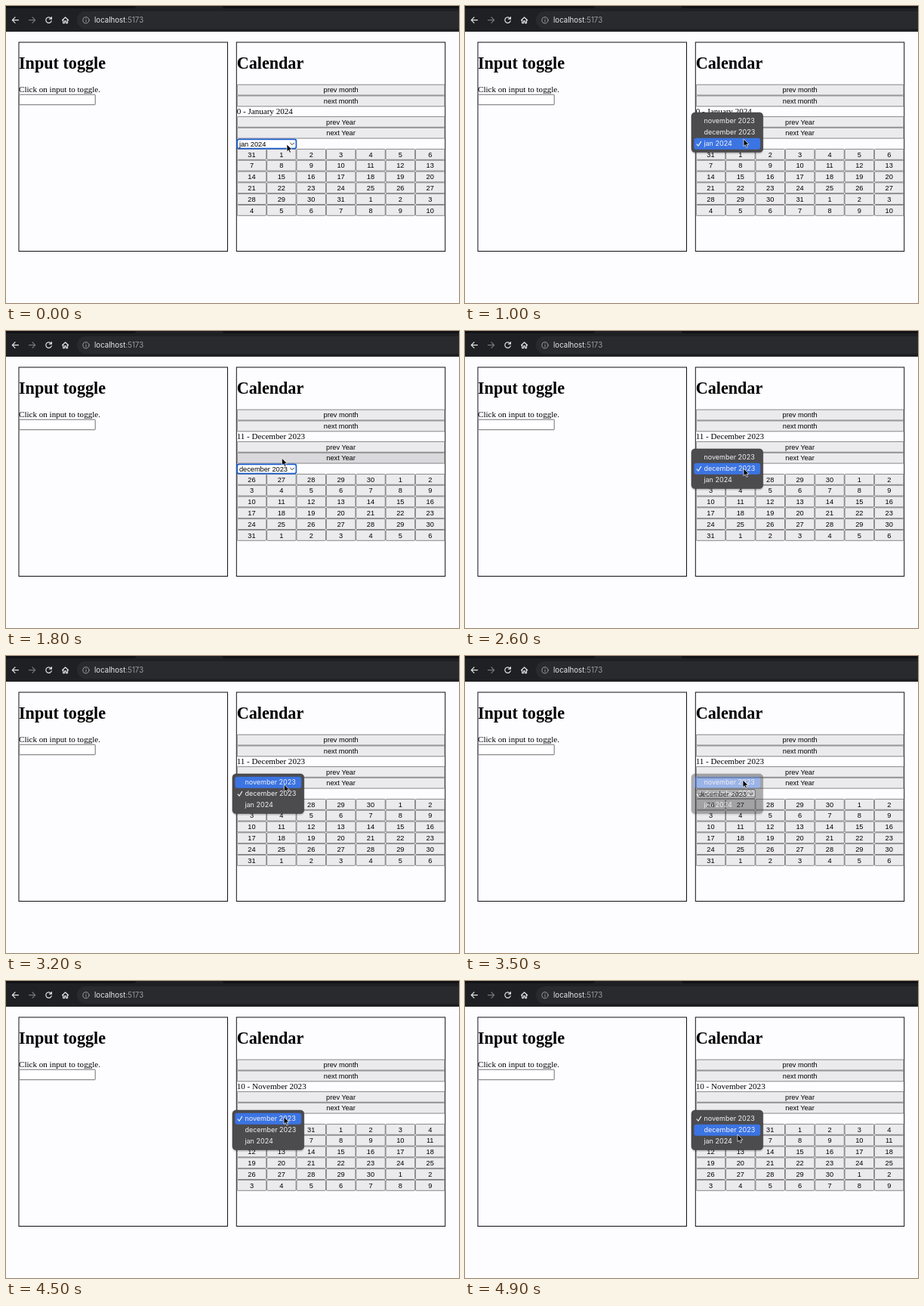
Recreate the animation shown at these times as an HTML page. Size 600 by 393 pixels, loop 5 s.

```html
<!DOCTYPE html>
<html lang="en">
<head>
<meta charset="utf-8">
<title>Calendar</title>
<style>
html, body { margin: 0; width: 100%; height: 100%; overflow: hidden; background: #fdfcfe; }
svg { display: block; width: 600px; height: 393px; }
text { white-space: pre; }
.serif { font: 11.08px "Liberation Serif", "Times New Roman", serif; }
.h1 { font: bold 22.15px "Liberation Serif", "Times New Roman", serif; }
.sans { font: 9.23px "Liberation Sans", Arial, sans-serif; }
.ui { font: 9px Inter, sans-serif; fill: #f2f1f4; }
.url { font: 9.7px Inter, sans-serif; fill: #e8e8ea; }
.mid { text-anchor: middle; }
.btn { fill: #ebeaed; stroke: #6b6a6d; stroke-width: .8; }
.btn.hover { fill: #d9d8dc; }
.line { fill: none; stroke-linecap: round; stroke-linejoin: round; }
</style>
</head>
<body>
<svg id="stage" viewBox="0 0 600 393">
  <rect width="600" height="393" fill="#fdfcfe"/>
  <rect width="600" height="34" fill="#1f2023"/>
  <path d="M0 0H172Q172 3 169 3H0ZM287 0H600V3H290Q287 3 287 0Z" fill="#111215"/>
  <rect x="94" y="7" width="520" height="23" rx="11.5" fill="#292a2d"/>
  <g class="line" stroke="#e3e3e6" stroke-width="1.2">
    <path d="M16.5 18.7H8.3M12 15L8.3 18.7L12 22.4"/>
    <path d="M30.5 18.7H38.7M35 15L38.7 18.7L35 22.4" stroke="#76777a"/>
    <path d="M59.6 16.2A3.8 3.8 0 1 0 60.3 19.7M60.4 14.6V17.2H57.6"/>
    <path d="M74.6 18.8L78.6 15L82.6 18.8M75.7 18V22.6H77.6V19.8H79.6V22.6H81.5V18"/>
    <g stroke="#a5a6a9" stroke-width=".9">
      <circle cx="106" cy="18.8" r="4.1"/>
      <path d="M106 18.5V20.9M106 16.7V16.8"/>
    </g>
  </g>
  <text class="url" x="117" y="22.3">localhost<tspan fill="#9b9ca0">:5173</tspan></text>

  <g fill="none" stroke="#111" stroke-width="1">
    <rect x="17" y="48" width="276.5" height="276.5"/>
    <rect x="305.3" y="48" width="276.4" height="276.5"/>
  </g>
  <text class="h1" x="17" y="83">Input toggle</text>
  <text class="serif" x="17" y="114">Click on input to toggle.</text>
  <rect x="17.5" y="117.2" width="100.7" height="13.5" rx=".6" fill="#fff" stroke="#6f6e71"/>
  <text class="h1" x="305.7" y="83">Calendar</text>
  <text class="serif" id="label" x="305.7" y="143.3"></text>
  <g id="buttons"></g>

  <g id="select">
    <rect id="ring" x="306.1" y="176.4" width="78.3" height="12.2" rx="2.4" fill="#fff"/>
    <text class="sans" id="value" x="308.9" y="185.6"></text>
    <path class="line" d="M376.6 181.3L379 183.7L381.4 181.3" stroke="#333" stroke-width="1"/>
  </g>

  <g id="popup">
    <rect x="299.3" y="1" width="96" height="54" rx="5.5" fill="#000" opacity=".12"/>
    <rect x="300" y="0" width="94.6" height="52.6" rx="4.5" fill="#4c4b4e" stroke="#39383b" stroke-width=".6"/>
    <rect id="mark" x="303.4" width="87.8" height="15" rx="3" fill="#3b74e3"/>
    <path id="check" class="line" d="M307 .6L309 3L312.6 -2.8" stroke="#f5f5f7" stroke-width="1.1"/>
  </g>
  <path id="arrow" d="M0 0V9.7L2.2 7.7L3.8 11.2L5.4 10.5L3.9 7.1H7Z" fill="#000" stroke="#fff" stroke-width=".7" stroke-linejoin="round"/>
</svg>
<script>
const $ = id => document.getElementById(id);

function add(parent, tag, attrs, text = "") {
  const el = document.createElementNS("http://www.w3.org/2000/svg", tag);
  for (const k in attrs) el.setAttribute(k, attrs[k]);
  el.textContent = text;
  parent.append(el);
  return el;
}

function button(x, y, w, text) {
  const box = add($("buttons"), "rect", { class: "btn", x: x + .4, y, width: w - .8, height: 13.9, rx: 1 });
  const label = add($("buttons"), "text", { class: "sans mid", x: x + w / 2, y: y + 10.1 }, text);
  return { box, label };
}

const LEFT = 305.8, WIDTH = 275.6, PITCH = 14.8, ROW = 15;
button(LEFT, 104.1, WIDTH, "prev month");
button(LEFT, 118.9, WIDTH, "next month");
button(LEFT, 146.4, WIDTH, "prev Year");
const nextYear = button(LEFT, 161.2, WIDTH, "next Year").box;

const cells = [];
for (let i = 0; i < 42; i++) {
  const w = WIDTH / 7;
  cells.push(button(LEFT + (i % 7) * w, 189.4 + Math.floor(i / 7) * PITCH, w, "").label);
}

const months = [
  { year: 2023, month: 10, name: "November", option: "november 2023" },
  { year: 2023, month: 11, name: "December", option: "december 2023" },
  { year: 2024, month: 0, name: "January", option: "jan 2024" }
];
months.forEach((m, i) =>
  add($("popup"), "text", { class: "ui", x: 316.4, y: 14.3 + i * ROW }, m.option));

// time, x, y of the pointer tip
const path = [
  [0, 372, 183], [400, 372, 183], [700, 370, 179], [900, 370, 179], [1000, 369, 176],
  [1500, 366, 168], [1600, 365, 167], [2100, 366, 170], [2300, 369, 181], [2600, 369, 182],
  [2800, 369, 182], [3400, 368, 164], [3600, 368, 164], [4000, 368, 170],
  [4200, 368, 176], [4600, 368, 181], [4900, 361, 203]
];
const opened = [[500, 1600], [2400, 3500], [4500, 5000]];
const FADE = 100;

function pointer(t) {
  const i = path.findIndex(p => p[0] >= t);
  if (i <= 0) return path[0].slice(1);
  const [t0, x0, y0] = path[i - 1], [t1, x1, y1] = path[i];
  const k = (t - t0) / (t1 - t0);
  return [x0 + (x1 - x0) * k, y0 + (y1 - y0) * k];
}

let shown = -1;
function showMonth(sel) {
  if (sel === shown) return;
  shown = sel;
  const m = months[sel];
  const offset = new Date(m.year, m.month, 1).getDay();
  cells.forEach((c, i) => c.textContent = new Date(m.year, m.month, 1 - offset + i).getDate());
  $("label").textContent = `${m.month} - ${m.name} ${m.year}`;
  $("value").textContent = m.option;
}

function render(now) {
  const t = Math.floor((now % 5000) / 100) * 100;
  const [x, y] = pointer(t);
  const sel = t < 1700 ? 2 : t < 3600 ? 1 : 0;
  const open = opened.find(([a, b]) => t >= a && t < b + FADE);
  const fading = open && t >= open[1];
  showMonth(sel);

  $("popup").style.display = open ? "" : "none";
  if (open) {
    const top = 171 - sel * ROW;
    const over = Math.max(0, Math.min(2, Math.floor((y - top - 3.5) / ROW)));
    $("popup").setAttribute("transform", `translate(0 ${top})`);
    $("popup").setAttribute("opacity", fading ? .45 : 1);
    $("mark").setAttribute("y", 3.7 + over * ROW);
    $("check").setAttribute("transform", `translate(0 ${11.2 + sel * ROW})`);
  }

  $("ring").setAttribute("stroke", open ? "#6f6e71" : "#1b5fd0");
  $("ring").setAttribute("stroke-width", open ? .8 : 1.7);
  nextYear.classList.toggle("hover", !open && y > 161 && y < 175.5);
  $("arrow").setAttribute("transform", `translate(${x} ${y})`);
}

function loop() {
  render(performance.now());
  requestAnimationFrame(loop);
}
loop();
</script>
</body>
</html>
```
